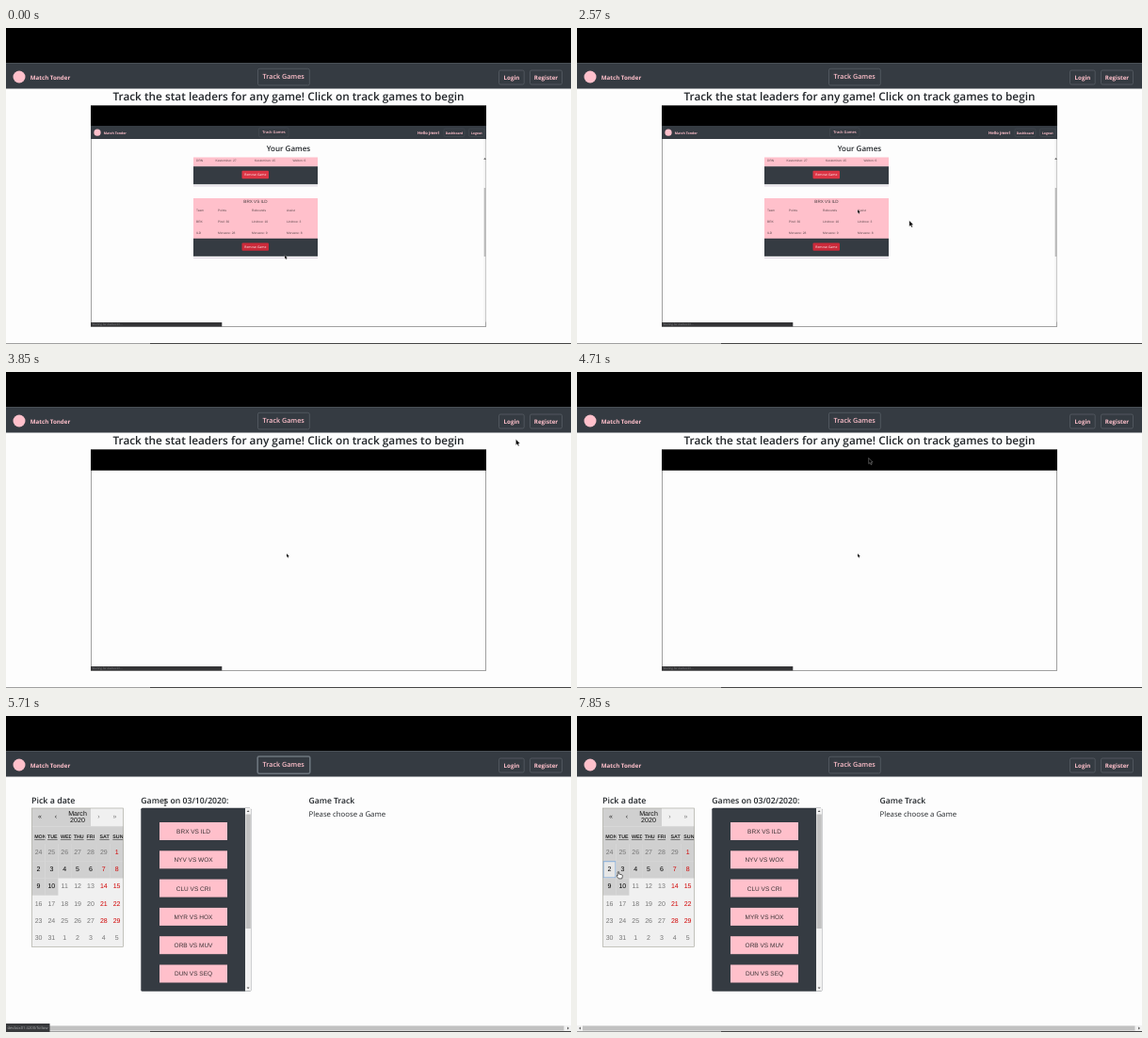
These frames come from a looping animation (600 px wide and 336 px high, 8000 ms). An HTML page:

```html
<!DOCTYPE html>
<html lang="en">
<head>
<meta charset="utf-8">
<title>Match stats</title>
<style>
html, body { margin: 0; width: 100%; height: 100%; overflow: hidden; background: #fdfdfd; }
svg { display: block; }
text { font-family: "Open Sans", "Noto Sans", sans-serif; text-rendering: geometricPrecision; white-space: pre; }
.b { font-weight: 600; }
.bb { font-weight: 700; }
.a { font-family: "Liberation Sans", Arial, sans-serif; }
.day { font-weight: 700; text-decoration: underline dotted; }
.m { text-anchor: middle; }
</style>
</head>
<body>
<svg id="stage" width="600" height="336" viewBox="0 0 600 336"></svg>
<script>
const LOOP = 8000, STEP = 1000 / 7;
const DARK = '#353b42', PINK = '#ffc0cb', INK = '#212529', EDGE = '#5c636a', SHADE = '#d0d0d0', PALE = '#f0f0f0';
const BRAND = 'Match Tonder';
const GAMES = ['BRX VS ILD', 'NYV VS WOX', 'CLU VS CRI', 'MYR VS HOX', 'ORB VS MUV', 'DUN VS SEQ'];

// Pointer path: time, x, y
const POINTER = [
  [1700, 425, 228], [2140, 352.5, 205], [2570, 352.5, 205], [3000, 460, 130], [3420, 543.5, 70.5],
  [3850, 543.5, 70.5], [4280, 420, 138], [4710, 310, 92], [5000, 292, 52], [5430, 292, 52],
  [5570, 266, 55], [5710, 170, 88], [6140, 70, 130], [6570, 39, 149.5], [7000, 35, 160],
  [7280, 35, 162], [7850, 44, 165.5]
];
const VIDEO_POINTER = [[1430, 296, 241.5], [1860, 298, 193]];

const rect = (x, y, w, h, fill, more = '') =>
  `<rect x="${x}" y="${y}" width="${w}" height="${h}" fill="${fill}" ${more}/>`;
const text = (x, y, size, str, fill = INK, cls = '') =>
  `<text x="${x}" y="${y}" font-size="${size}" fill="${fill}" class="${cls}">${str}</text>`;
const dot = (x, y, r) => `<circle cx="${x}" cy="${y}" r="${r}" fill="${PINK}"/>`;
const triangle = (x, y, turn, fill = '#505050') =>
  `<path d="M-1.4 .8H1.4L0-1Z" transform="translate(${x} ${y}) rotate(${turn})" fill="${fill}"/>`;
const outline = (x, y, w, h, color = EDGE, width = .7, fill = 'none') =>
  rect(x, y, w, h, fill, `rx="1.6" stroke="${color}" stroke-width="${width}"`);
const bottomLine = () => rect(0, 335, 153, 1, '#a0a0a0') + rect(153, 335, 447, 1, '#444');

function along(path, t) {
  if (t <= path[0][0]) return path[0].slice(1);
  const i = path.findIndex(p => p[0] >= t);
  if (i < 0) return path[path.length - 1].slice(1);
  const [t0, x0, y0] = path[i - 1], [t1, x1, y1] = path[i];
  const k = (t - t0) / (t1 - t0);
  return [x0 + (x1 - x0) * k, y0 + (y1 - y0) * k];
}

const SHAPES = {
  arrow: '<path d="M0 0V6.2L1.4 5 2.5 7.2 3.5 6.7 2.6 4.5H4.4Z" fill="#000" stroke="#fff" stroke-width=".3"/>',
  hand: '<path d="M-.8 .4Q0-.5 .7 .4V2.6L3.8 3.4Q4.5 3.7 4.3 5L3.7 7.4H.2L-2 4.6Q-2 3.6-.8 4.3Z" fill="#fff" stroke="#222" stroke-width=".7"/>',
  beam: '<path d="M-1.2 0H1.2M0 0V7M-1.2 7H1.2" fill="none" stroke="#222" stroke-width=".7"/>'
};
const cursor = (kind, [x, y], scale = 1) =>
  `<g transform="translate(${x} ${y}) scale(${scale})">${SHAPES[kind]}</g>`;

function header(hover, focus) {
  return rect(0, 0, 600, 37, '#000') + rect(0, 37, 600, 27.5, DARK) + rect(0, 37, 600, 1, '#4a5057') +
    dot(14, 52, 6.5) + text(25.7, 54.8, 6.2, BRAND, PINK, 'bb') +
    (focus ? outline(267.2, 43, 55.6, 18.2, '#6c757d', 1.6)
           : outline(267.5, 43.3, 54.8, 17.6, hover ? '#7b848c' : EDGE, .7, hover ? '#6c757d' : 'none')) +
    text(294.7, 53.6, 7.2, 'Track Games', PINK, 'b m') +
    outline(523.5, 45, 26.7, 15) + text(537, 54.9, 6.2, 'Login', PINK, 'bb m') +
    outline(556.5, 45, 34, 15) + text(573.5, 54.9, 6.2, 'Register', PINK, 'bb m');
}

function videoNav() {
  return rect(90, 104, 420, 14, DARK) + dot(97, 111.2, 3.6) +
    text(103.8, 112.8, 3.5, BRAND, PINK, 'bb') +
    outline(268.5, 106, 31.5, 10, '#4b5158', .5) + text(284.5, 112.2, 4, 'Track Games', PINK, 'b m') +
    text(448.5, 112.7, 4.2, 'Hello jmerl', PINK, 'bb m') +
    outline(465, 107, 22, 8.5, '#4b5158', .5) + text(476, 112.6, 3.4, 'Dashboard', PINK, 'bb m') +
    outline(491.5, 107, 16.5, 8.5, '#4b5158', .5) + text(499.8, 112.6, 3.4, 'Logout', PINK, 'bb m');
}

function statRow(y, cells, xs) {
  return cells.map((c, i) => text(xs[i], y, 3.3, c, '#5a474c', 'a')).join('');
}

function cardFoot(y, red) {
  return rect(199, y, 132, 19, DARK) + rect(250.5, y + 4.6, 28.5, 8.4, red, 'rx="1"') +
    text(264.8, y + 10, 3.4, 'Remove Game', '#fff', 'm') + rect(199, y + 20.3, 132, .9, '#d8cfdc');
}

function videoPage() {
  const xs = [202, 225, 261, 298];
  return text(300, 131.2, 8, 'Your Games', INK, 'b m') +
    rect(199, 137.5, 132, 10, PINK) +
    statRow(142.4, ['DRN', 'Kestomirun: 27', 'Kestomirun: 15', 'Welton: 6'], [202, 222.5, 264, 304.5]) +
    cardFoot(147.2, '#dc3545') +
    rect(199, 181, 132, 43.5, PINK) + text(265, 186.1, 4.6, GAMES[0], '#443a3d', 'a m') +
    statRow(195.2, ['Team', 'Points', 'Rebounds', 'Assist'], xs) +
    statRow(207.2, ['BRX', 'Pirel: 30', 'Lindrow: 10', 'Lindrow: 3'], xs) +
    statRow(218.8, ['ILD', 'Morvane: 28', 'Morvane: 9', 'Morvane: 8'], xs) +
    cardFoot(223.8, '#cb2a3a') +
    rect(507.5, 118.5, 2, 194, '#f1f1f1') + rect(507.7, 170, 1.7, 73, '#b8b8b8') + triangle(508.6, 139, 0);
}

function homePage(n, t) {
  return header(n >= 35, false) +
    text(300, 76.8, 11.82, 'Track the stat leaders for any game! Click on track games to begin', INK, 'b m') +
    rect(90.5, 82.5, 419, 235, '#fdfdfd', 'stroke="#a0a0a0"') +
    rect(90, 82.5, 420, 22.2, '#000') +
    (n < 21 || n >= 34 ? videoNav() : '') + (n < 21 ? videoPage() : '') +
    rect(90, 313, 139.3, 4.5, '#343436') + text(91.5, 316.4, 3, 'Waiting for devbox01...', '#85878a') +
    cursor('arrow', along(VIDEO_POINTER, t), .65) + bottomLine();
}

function calendar(hover, selected) {
  const w = 13.85, h = 18.2, top = 136;
  let out = rect(27.5, 98, 97, 147.3, PALE) + rect(27.5, 98, 62.5, 19.3, SHADE) +
    rect(27.5, 117.3, 97, top - 117.3, SHADE) +
    text(36, 109.3, 7, '«', '#222', 'a m') + text(53, 109.3, 7, '‹', '#222', 'a m') +
    text(76, 105.6, 7.1, 'March', '#111', 'a m') + text(76, 113.3, 7.1, '2020', '#111', 'a m') +
    text(98.5, 109.3, 7, '›', '#777', 'a m') + text(115.5, 109.3, 7, '»', '#777', 'a m');
  'MON TUE WED THU FRI SAT SUN'.split(' ').forEach((d, i) => {
    out += `<svg x="${27.6 + w * i}" y="117" width="${w}" height="19">${text(2.6, 13.4, 5.3, d, '#222', 'a day')}</svg>`;
  });
  for (let i = 0; i < 42; i++) {
    const x = 27.6 + w * (i % 7), y = top + h * Math.floor(i / 7);
    const date = new Date(2020, 1, 24 + i), day = date.getDate();
    const inMonth = date.getMonth() === 2, open = i < 16;
    const color = inMonth && i % 7 > 4 ? '#d10000' : inMonth && open ? '#000' : '#757575';
    if (open) out += rect(x, y, w + .1, h + .1, i === hover || i === selected ? '#e6e6e6' : SHADE);
    if (i === selected) out += rect(x + .5, y + .5, w - 1, h - 1, 'none', 'stroke="#83abd8"');
    out += text(x + w / 2, y + 11, 7, day, color, 'a m');
  }
  return out + rect(27.5, 98, 97, 147.3, 'none', 'stroke="#a0a096" stroke-width=".6"');
}

function gameList() {
  return rect(143.3, 97.8, 117, 195, DARK, 'rx="1.5"') + rect(254, 98, 6.3, 194.6, '#f1f1f1') +
    rect(254.5, 104.5, 5.3, 121.5, '#c1c1c1') + triangle(257.1, 101.3, 0) + triangle(257.1, 289.3, 180) +
    GAMES.map((g, i) => rect(163, 113 + 30.3 * i, 72, 19, PINK) +
      text(199, 124.9 + 30.3 * i, 6.5, g, '#3a3235', 'a m')).join('');
}

function trackPage(n) {
  const picked = n >= 49;
  return header(false, !picked) +
    text(27, 93, 8.9, 'Pick a date', INK, 'b') +
    calendar(n >= 44 && n < 48 ? 0 : n >= 48 ? 7 : -1, picked ? 7 : -1) +
    text(143.3, 93, 8.7, `Games on 03/${picked ? '02' : '10'}/2020:`, INK, 'b') + gameList() +
    text(321.5, 93, 8.6, 'Game Track', INK, 'b') + text(321.5, 107, 7.8, 'Please choose a Game') +
    rect(0, 329, 600, 6, '#f1f1f1') + rect(6, 329.5, 586.5, 5, '#c1c1c1') +
    triangle(3, 332, -90) + triangle(597, 332, 90) + bottomLine();
}

function pointerKind(n) {
  if (n < 35) return 'arrow';
  return n === 40 || n === 41 ? 'beam' : 'hand';
}

function scene(n) {
  const t = n * STEP;
  return rect(0, 0, 600, 336, '#fdfdfd') + (n < 40 ? homePage(n, t) : trackPage(n)) +
    (n >= 35 && n < 43 ? rect(0, 327, 46.5, 9, '#38393c') + text(1.5, 333.2, 4.2, 'devbox01:4200/follow', '#a8aaac') : '') +
    (n >= 12 ? cursor(pointerKind(n), along(POINTER, t)) : '');
}

const stage = document.getElementById('stage');
let shown = -1;
function tick(now) {
  const n = Math.floor((now % LOOP + 9) / STEP) % 56;
  if (n !== shown) stage.innerHTML = scene(shown = n);
  requestAnimationFrame(tick);
}
tick(0);
</script>
</body>
</html>
```
